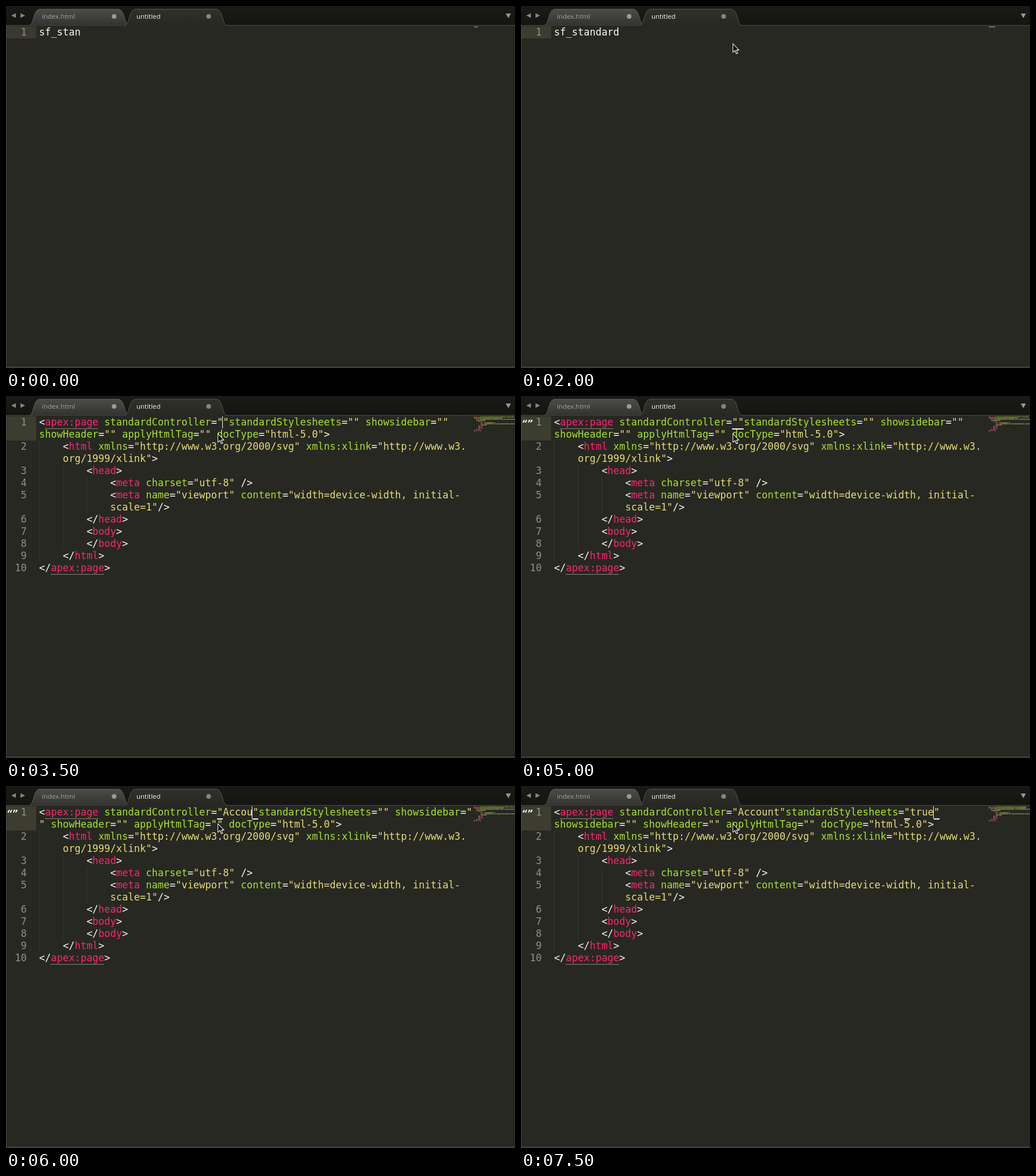
An HTML page with a canvas for the animation above (8000 ms loop, 878 by 626 pixels).

```html
<!DOCTYPE html>
<html lang="en">
<head>
<meta charset="utf-8">
<title>Snippet expansion in a code editor</title>
<style>
html, body { margin: 0; width: 100%; height: 100%; overflow: hidden; background: #272822; }
canvas { display: block; }
</style>
</head>
<body>
<canvas id="stage" width="878" height="626"></canvas>
<script>
const ctx = document.getElementById('stage').getContext('2d');
const LOOP = 8000, EXPAND = 3500, MATCH = 3750, NEXT_FIELD = 6500;
const LEFT = 57, TOP = 35, CELL = 10.235, ROW = 21, MAX_COLS = 73;
const WHITE = '#f8f8f2', PINK = '#f92672', GREEN = '#a6e22e', YELLOW = '#e6db74';
const MONO = '17px "DejaVu Sans Mono", monospace';

// Each track holds [start time, value] pairs; the value stays until the next.
const trigger = [[0, 'sf_stan'], [1250, 'sf_standa'], [1500, 'sf_standard']];
const controller = [[0, ''], [5500, 'Ac'], [5750, 'Acco'], [6000, 'Accou'], [6250, 'Account']];
const stylesheets = [[0, ''], [7250, 'tr'], [7500, 'true']];
const caretAlpha = [[0, 0], [500, 1], [1000, 0], [1250, 1], [2000, 0], [2250, .5], [2500, 1],
  [2750, 0], [3250, 1], [4000, 0], [4500, 1], [4750, .5], [5000, 0], [5500, 1], [7000, 0], [7250, 1]];
const at = (track, t) => track.filter(([start]) => start <= t).pop()[1];

const columnX = col => LEFT + col * CELL;
const rowY = row => TOP + row * ROW;

function rect(x, y, w, h, color) {
  ctx.fillStyle = color;
  ctx.fillRect(x, y, w, h);
}

function shape(points, color) {
  ctx.beginPath();
  points.forEach(([x, y]) => ctx.lineTo(x, y));
  ctx.closePath();
  ctx.fillStyle = color;
  ctx.fill();
}

function text(str, x, y, font, color) {
  ctx.font = font;
  ctx.fillStyle = color;
  ctx.fillText(str, x, y);
}

function vertical(y0, y1, from, to) {
  const gradient = ctx.createLinearGradient(0, y0, 0, y1);
  gradient.addColorStop(0, from);
  gradient.addColorStop(1, to);
  return gradient;
}

function pageSource(account, sheets) {
  return [
    `<apex:page standardController="${account}"standardStylesheets="${sheets}" ` +
      'showsidebar="" showHeader="" applyHtmlTag="" docType="html-5.0">',
    '    <html xmlns="http://www.w3.org/2000/svg" xmlns:xlink="http://www.w3.org/1999/xlink">',
    '        <head>',
    '            <meta charset="utf-8" />',
    '            <meta name="viewport" content="width=device-width, initial-scale=1"/>',
    '        </head>',
    '        <body>',
    '        </body>',
    '    </html>',
    '</apex:page>'
  ];
}

// One colour per character.
function highlight(line) {
  const colors = [];
  let previous = '';
  for (const token of line.match(/"[^"]*"|<\/?|[\w:]+|./g)) {
    const color = token[0] === '"' ? YELLOW
      : !/^\w/.test(token) ? WHITE
      : previous[0] === '<' ? PINK : GREEN;
    for (const _ of token) colors.push(color);
    previous = token;
  }
  return colors;
}

// Soft wrap at word borders, keeping the indent of the line.
function layout(lines, plain) {
  const cells = [], rows = [];
  lines.forEach((line, n) => {
    const colors = plain ? [] : highlight(line);
    const indent = line.search(/\S/);
    let col = 0, i = 0;
    rows.push({ number: n + 1, indent });
    for (const word of line.match(/\w+|\W/g)) {
      if (word !== ' ' && col + word.length > MAX_COLS) {
        rows.push({ indent });
        col = indent;
      }
      for (const char of word) {
        if (col < MAX_COLS && char !== ' ')
          cells.push({ char, col, row: rows.length - 1, color: colors[i] || WHITE });
        if (col < MAX_COLS) col++;
        i++;
      }
    }
  });
  return { cells, rows };
}

function tab(x, right, fill, edge) {
  ctx.beginPath();
  ctx.moveTo(x, 33.5);
  ctx.bezierCurveTo(x + 9, 32, x + 6, 5.5, x + 19, 5.5);
  ctx.lineTo(right - 19, 5.5);
  ctx.bezierCurveTo(right - 6, 5.5, right - 9, 32, right, 33.5);
  ctx.fillStyle = fill;
  ctx.fill();
  ctx.strokeStyle = edge;
  ctx.lineWidth = 1;
  ctx.stroke();
}

function dot(x, color) {
  ctx.beginPath();
  ctx.arc(x, 18, 4, 0, 2 * Math.PI);
  ctx.fillStyle = color;
  ctx.fill();
}

function drawWindow() {
  const label = '11.5px "Open Sans", sans-serif', gray = '#858581';
  rect(0, 0, 878, 626, '#272822');
  rect(0, 0, 878, 33, vertical(0, 33, '#1a1b17', '#141510'));
  rect(0, 33, 878, 1, '#4b4c46');
  tab(40, 212, vertical(5, 33, '#4c4c4a', '#333431'), '#5d5d59');
  tab(205, 381, vertical(5, 33, '#30312b', '#272822'), '#55564f');
  rect(207, 33, 172, 2, '#272822');
  text('index.html', 62, 22, label, '#a3a3a0');
  text('untitled', 225, 22, label, '#f4f4f0');
  dot(186.5, '#9a9a97');
  dot(349.5, gray);
  shape([[9, 16.5], [17, 12.5], [17, 20.5]], gray);
  shape([[33, 16.5], [25, 12.5], [25, 20.5]], gray);
  shape([[862, 13], [871, 13], [866.5, 21]], '#979793');
  rect(0, 34, 1, 592, '#4b4c48');
  rect(0, 624, 878, 1, '#5a5b56');
}

function drawCode({ cells, rows }, gutterColor) {
  const firstLineRows = rows.filter((row, i) => i === 0 || (i === 1 && !row.number)).length;
  rect(1, TOP, 51, firstLineRows * ROW, gutterColor);
  rows.forEach(({ number, indent }, row) => {
    for (let col = 0; col < indent; col += 4)
      rect(Math.round(columnX(col)), rowY(row), 1, ROW, '#36372f');
    [...String(number || '')].reverse().forEach((digit, i) =>
      text(digit, 25.5 - i * CELL, rowY(row) + 16, MONO, '#8f908a'));
  });
  for (const { char, col, row, color } of cells) {
    text(char, columnX(col), rowY(row) + 16, MONO, color);
    ctx.globalAlpha = .5;
    rect(807 + col, 35.5 + row * 2, 1, 1.4, color);
    ctx.globalAlpha = 1;
  }
}

function drawPointer() {
  shape([[365, 64], [365, 81], [369, 78], [371, 83], [374.5, 82], [372.5, 77], [377, 76.5]], WHITE);
  shape([[366, 66.5], [366, 79], [369.3, 76], [371.8, 81.5], [373.2, 81], [370.8, 75.7], [374.7, 75.6]], '#10110e');
}

function underline(col, count, row, height, color) {
  rect(Math.round(columnX(col)), rowY(row + 1), Math.round(count * CELL), height, color);
}

function draw(t) {
  const expanded = t >= EXPAND;
  const word = at(trigger, t), account = at(controller, t), sheets = at(stylesheets, t);
  const code = expanded ? layout(pageSource(account, sheets)) : layout([word], true);
  let caret = word.length;

  drawWindow();
  drawCode(code, t < 500 ? '#3b392f' : '#3c3d2f');
  if (expanded) {
    const second = t >= NEXT_FIELD;
    const open = second ? 53 + account.length : 31;
    const value = second ? sheets : account;
    caret = open + value.length;
    underline(1, 9, 0, 1, '#85857c');
    underline(2, 9, code.rows.length - 1, 1, '#85857c');
    if (t >= MATCH) {
      underline(open - 1, 1, 0, 2, WHITE);
      underline(caret, 1, 0, 2, WHITE);
      text('“”', 1, 53, 'italic bold 15px "DejaVu Sans", sans-serif', WHITE);
    }
  }
  ctx.globalAlpha = at(caretAlpha, t);
  rect(Math.floor(columnX(caret) - .5), TOP, 1, ROW, WHITE);
  ctx.globalAlpha = 1;
  if (t >= 250) drawPointer();
}

const start = performance.now();
function tick() {
  draw((performance.now() - start) % LOOP);
  requestAnimationFrame(tick);
}
tick();
</script>
</body>
</html>
```
